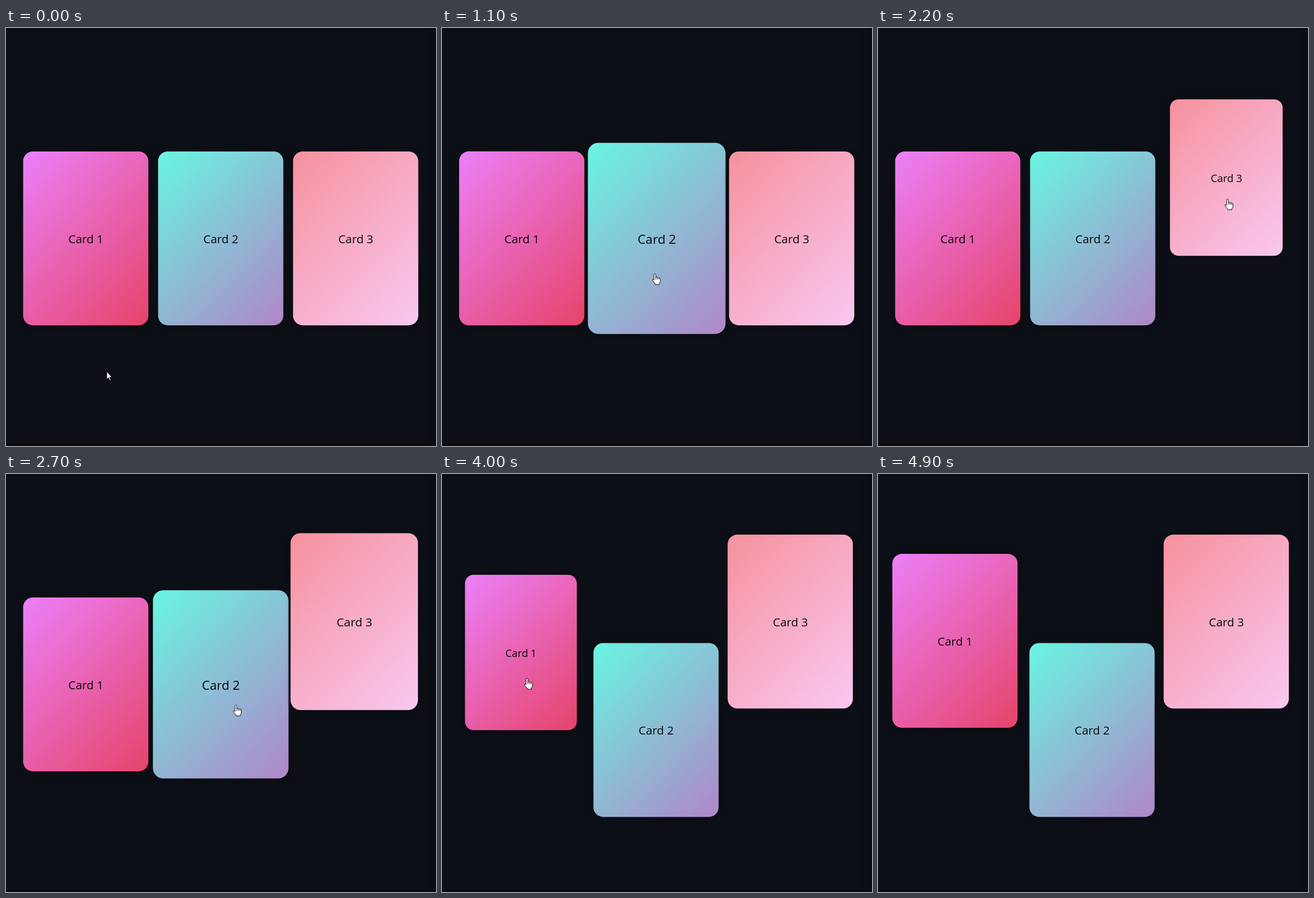
An HTML page that plays this animation: 759 by 738 pixels, repeating every 5 s.

```html
<!DOCTYPE html>
<html lang="en">
<head>
<meta charset="utf-8">
<title>Draggable cards</title>
<style>
  html, body { margin: 0; width: 100%; height: 100%; overflow: hidden; background: #0d0f16; }
  body { position: relative; box-shadow: inset 0 -4px #0a0b0e, inset -12px 0 12px -6px #080c14; }
  .card {
    position: absolute; left: 0; top: 0; width: 221.4px; height: 306.6px;
    box-sizing: border-box; padding-top: 1px; border-radius: 17px;
    display: flex; align-items: center; justify-content: center;
    font: 20.5px "Open Sans", "Noto Sans", sans-serif; color: #08080a;
    box-shadow: 0 1px 8px rgba(0, 0, 0, .35);
  }
  #pointer { position: absolute; left: 0; top: 0; width: 1px; height: 1px; overflow: visible; }
  #pointer path { fill: #fff; stroke: #111; stroke-linejoin: round; }
</style>
</head>
<body>
<div class="card" style="background: linear-gradient(135deg, #eb80f8, #e6446a)">Card 1</div>
<div class="card" style="background: linear-gradient(135deg, #69f5e2, #b086c8)">Card 2</div>
<div class="card" style="background: linear-gradient(135deg, #f7919e, #f8c8f0)">Card 3</div>
<svg id="pointer">
  <path id="arrow" d="M0 0V13.5L3 10.8L5.2 15.9L7.2 15L5 10H9Z"/>
  <path id="hand" d="M-1.6 1.6Q-1.6 0 0 0T1.6 1.6V6Q3 5 4.3 6.4Q5.8 5.6 7 7.2Q9.5 7 9.5 9V13Q9.5 16 7.6 17V19H.4V17.2L-4.4 12Q-5.2 9.6 -3.2 9.8L-1.6 11.4ZM1.6 6V10M4.3 6.4V10M7 7.2V10.2"/>
</svg>
<script>
const LOOP = 5000, GONE = 4650;
const WIDTH = 221.4, HEIGHT = 306.6;

// pointer key points: time, x, y
const path = [
  [0, 178, 607], [450, 150, 440], [560, 160, 438], [850, 345, 440], [1100, 375.5, 434],
  [1350, 450, 428], [1600, 600, 415], [1900, 619.4, 409.3], [2200, 617, 302],
  [2470, 616.9, 297.8], [2700, 406, 408], [2850, 375, 407], [3020, 373.8, 487.5],
  [3290, 373.8, 487.5], [3400, 307, 486], [3550, 150, 440], [3770, 151.5, 417],
  [4000, 150, 361], [4150, 146.5, 340.2], [4600, 190, 21]
];

const cards = [...document.querySelectorAll('.card')].map((el, i) => ({
  el, x: 141 + 238.2 * i, y: 371.2, scale: 1, speed: 0, poses: []
}));

// each card is pressed and dragged once
Object.assign(cards[0], { press: 3770, release: 4150 });
Object.assign(cards[1], { press: 2850, release: 3290 });
Object.assign(cards[2], { press: 1900, release: 2425 });

function pointerAt(t) {
  let i = 1;
  while (i < path.length - 1 && path[i][0] < t) i++;
  const [t0, x0, y0] = path[i - 1], [t1, x1, y1] = path[i];
  const k = Math.min(1, (t - t0) / (t1 - t0));
  return [x0 + (x1 - x0) * k, y0 + (y1 - y0) * k];
}

// advance one millisecond: drag, hit test, then a spring on the scale
function step(card, t) {
  const [px, py] = pointerAt(t);
  const held = t >= card.press && t < card.release;
  if (held) {
    const [nx, ny] = pointerAt(t + 1);
    card.x += nx - px;
    card.y += ny - py;
  }
  const hover = Math.abs(px - card.x) < WIDTH / 2 * card.scale
    && Math.abs(py - card.y) < HEIGHT / 2 * card.scale;
  const goal = held ? 0.9 : hover ? 1.1 : 1;
  card.speed += (550 * (goal - card.scale) - 30 * card.speed) / 1000;
  card.scale += card.speed / 1000;
  card.poses.push({ x: card.x, y: card.y, scale: card.scale, hover });
}

for (let t = 0; t < LOOP; t++) cards.forEach(card => step(card, t));

const pointer = document.getElementById('pointer');
const arrow = document.getElementById('arrow');
const hand = document.getElementById('hand');
const show = (el, on) => { el.style.display = on ? '' : 'none'; };

function draw(t) {
  let hovering = false;
  for (const { el, poses } of cards) {
    const { x, y, scale, hover } = poses[Math.floor(t)];
    el.style.transform = `translate(${x - WIDTH / 2}px, ${y - HEIGHT / 2}px) scale(${scale})`;
    hovering ||= hover;
  }
  const [x, y] = pointerAt(t);
  pointer.style.transform = `translate(${x}px, ${y}px)`;
  show(pointer, t < GONE);
  show(hand, hovering);
  show(arrow, !hovering);
}

const start = performance.now();
function tick() {
  draw((performance.now() - start) % LOOP);
  requestAnimationFrame(tick);
}
tick();
</script>
</body>
</html>
```
